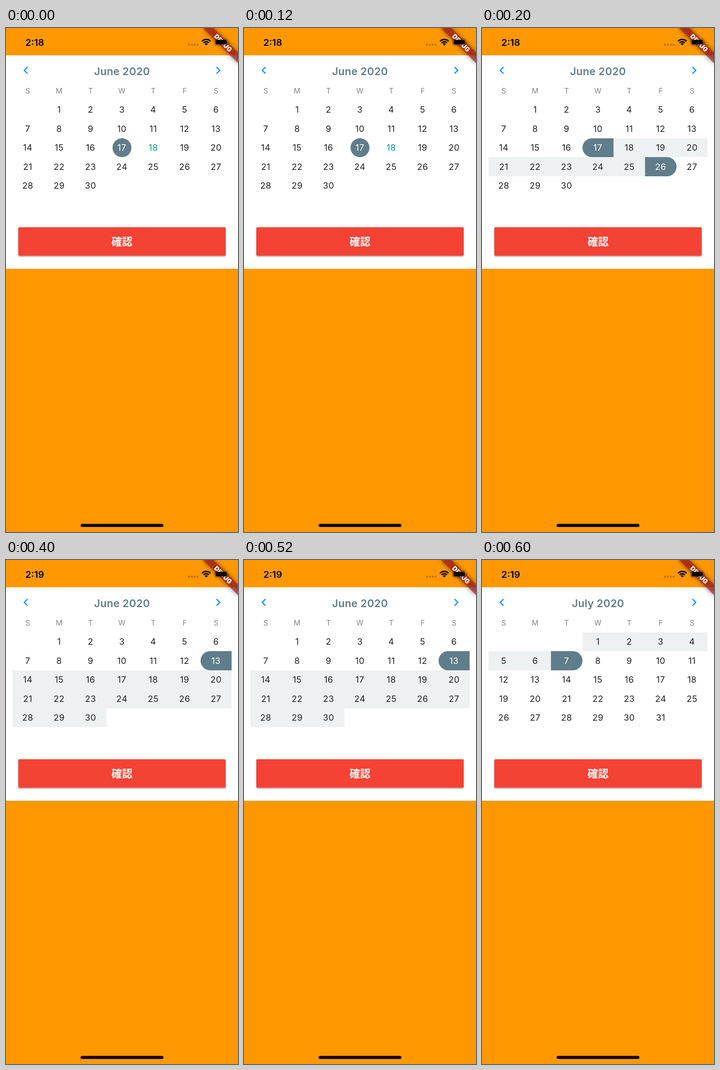
Recreate the animation shown at these times as an HTML page. Size 508x1101 px, loop 0.8 s.

```html
<!DOCTYPE html>
<html lang="en">
<head>
<meta charset="utf-8">
<title>Date range picker</title>
<style>
  html, body { margin: 0; width: 100%; height: 100%; overflow: hidden; background: #ff9800; }
  svg { display: block; width: 508px; height: 1101px; font-family: Inter, Roboto, sans-serif; }
  .mid { text-anchor: middle; }
  .time { font-size: 20.5px; font-weight: 600; }
  .title { font-size: 23px; font-weight: 600; letter-spacing: .3px; fill: #607d8b; }
  .week { font-size: 16px; fill: #858585; }
  .day { font-size: 19px; letter-spacing: .4px; fill: #212121; }
  .on { fill: #fff; }
  .today { fill: #009688; }
  .range { fill: #eef1f2; }
  .pick { fill: #607d8b; }
  .arrow { fill: #2196f3; }
  .confirm { font: 700 23px "Noto Sans CJK JP", "Noto Sans CJK", sans-serif; fill: #fff; }
  .debug { font-size: 13.8px; font-weight: 900; fill: #fff; }
  .view { visibility: hidden; animation: show 800ms step-end infinite; }
  @keyframes show {
    0% { visibility: visible; }
    25%, 100% { visibility: hidden; }
  }
</style>
</head>
<body>
<svg viewBox="0 0 508 1101">
  <defs>
    <filter id="soft" x="-30%" y="-150%" width="160%" height="400%"><feGaussianBlur stdDeviation="5.4"/></filter>
    <filter id="lift" x="-5%" y="-20%" width="110%" height="150%">
      <feDropShadow dx="0" dy="1.8" stdDeviation="1.6" flood-color="#000" flood-opacity=".38"/>
    </filter>
  </defs>

  <rect width="508" height="1101" fill="#ff9800"/>
  <rect y="59.6" width="508" height="466.4" fill="#fff"/>
  <path class="arrow" transform="translate(27.2 76.2) scale(1.355)" d="M15.41 7.41L14 6l-6 6 6 6 1.41-1.41L10.83 12z"/>
  <path class="arrow" transform="translate(448.3 76.2) scale(1.355)" d="M10 6L8.59 7.41 13.17 12l-4.58 4.59L10 18l6-6z"/>
  <g id="week"></g>
  <g id="views"></g>

  <rect x="27" y="435.2" width="454" height="62.3" rx="2.7" fill="#f44336" filter="url(#lift)"/>
  <text class="confirm mid" x="254" y="475">確認</text>

  <g transform="translate(508 0) rotate(45)">
    <rect x="-54.2" y="37.9" width="108.4" height="16.3" fill="#000" fill-opacity=".5" filter="url(#soft)"/>
    <rect x="-54.2" y="37.9" width="108.4" height="16.3" fill="#b71c1c" fill-opacity=".627"/>
    <text class="debug mid" x="0" y="51">DEBUG</text>
  </g>

  <g fill="#000" fill-opacity=".25">
    <circle cx="400.6" cy="36.5" r="2.3"/><circle cx="406.9" cy="36.5" r="2.3"/>
    <circle cx="413.2" cy="36.5" r="2.3"/><circle cx="419.5" cy="36.5" r="2.3"/>
  </g>
  <g transform="translate(438.5 38.3)" fill="none" stroke="#000" stroke-width="3">
    <path d="M-9.4-9.4A13.3 13.3 0 0 1 9.4-9.4M-5.9-5.9A8.4 8.4 0 0 1 5.9-5.9"/>
    <path d="M0 0L-3.5-3.5A5 5 0 0 1 3.5-3.5Z" fill="#000" stroke="none"/>
  </g>
  <rect x="456.9" y="23.8" width="28.6" height="14.4" rx="3.6" fill="none" stroke="#000" stroke-opacity=".38" stroke-width="1.3"/>
  <path d="M487.2 28.5a3 3 0 0 1 0 5z" fill-opacity=".4"/>
  <rect x="458.8" y="25.9" width="24.6" height="10.2" rx="2"/>
  <rect x="163.3" y="1083.3" width="181.5" height="6.8" rx="3.4" fill="#0b0b0b"/>
</svg>

<script>
  const LEFT = 13.5, TOP = 158, W = 68.7, H = 41.4;
  const edgeX = c => Math.round(LEFT + W * c);
  const edgeY = r => Math.round(TOP + H * r);
  const midX = c => LEFT + W * (c + .5) - .2;

  const text = (cls, x, y, s) => `<text class="${cls}" x="${x}" y="${y}">${s}</text>`;

  // Rounded on the left for a range start, on the right for a range end.
  function cap(col, row, isStart) {
    const a = edgeX(col), b = edgeX(col + 1), y = edgeY(row), h = edgeY(row + 1) - y, r = h / 2;
    const [flat, round, dir, sweep] = isStart ? [b, a, 1, 0] : [a, b, -1, 1];
    return `<path class="pick" d="M${flat} ${y}H${round + dir * r}a${r} ${r} 0 0 ${sweep} 0 ${h}H${flat}Z"/>`;
  }

  function month({ time, title, first, days, start, end, fill, today }) {
    const place = d => [(d - 1 + first) % 7, Math.floor((d - 1 + first) / 7)];
    let back = '', nums = '';

    if (fill) {
      const [c0, r0] = place(fill[0]), [c1, r1] = place(fill[1]);
      for (let r = r0; r <= r1; r++) {
        const a = edgeX(r === r0 ? c0 : 0), b = edgeX(r === r1 ? c1 + 1 : 7);
        back += `<rect class="range" x="${a}" y="${edgeY(r)}" width="${b - a}" height="${edgeY(r + 1) - edgeY(r)}"/>`;
      }
    }
    if (start && !fill) {
      const [c, r] = place(start);
      back += `<circle class="pick" cx="${LEFT + W * (c + .5)}" cy="${TOP + H * (r + .5)}" r="20.7"/>`;
    } else {
      if (start) back += cap(...place(start), true);
      if (end) back += cap(...place(end), false);
    }
    for (let d = 1; d <= days; d++) {
      const [c, r] = place(d);
      const state = d === start || d === end ? ' on' : d === today ? ' today' : '';
      nums += text('day mid' + state, midX(c), TOP + H * (r + .5) + 6.7, d);
    }
    return text('time', 42.2, 38.5, time) + text('title mid', 254, 103, title) + back + nums;
  }

  const june = { title: 'June 2020', first: 1, days: 30 };
  const july = { title: 'July 2020', first: 3, days: 31 };
  const views = [
    { ...june, time: '2:18', start: 17, today: 18 },
    { ...june, time: '2:18', start: 17, end: 26, fill: [18, 25] },
    { ...june, time: '2:19', start: 13, fill: [14, 30] },
    { ...july, time: '2:19', end: 7, fill: [1, 6] }
  ];

  document.getElementById('week').innerHTML =
    [...'SMTWTFS'].map((s, c) => text('week mid', midX(c), 143, s)).join('');
  document.getElementById('views').innerHTML = views
    .map((v, i) => `<g class="view" style="animation-delay:${i * 200 - 800}ms">${month(v)}</g>`)
    .join('');
</script>
</body>
</html>
```
